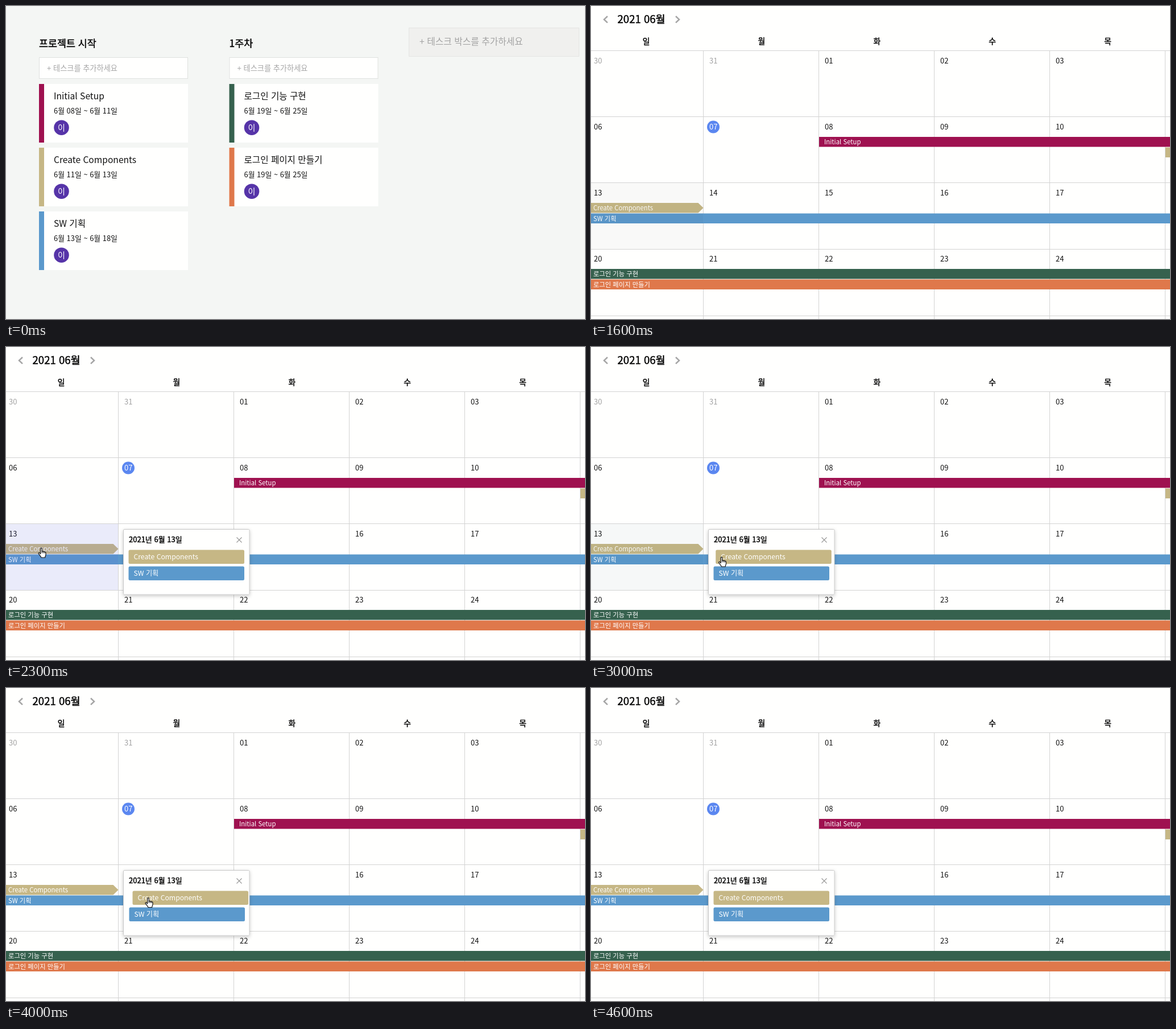
Animation, 1018 px wide and 550 px high, one loop 5400 ms. Source, as an HTML page:

```html
<!DOCTYPE html>
<html lang="ko">
<head>
<meta charset="utf-8">
<title>Task board and calendar</title>
<style>
  html, body { margin: 0; width: 100%; height: 100%; overflow: hidden; background: #fffffe; }
  svg { display: block; width: 100%; height: 100%; }
  text { font-family: "Noto Sans CJK KR", "Noto Sans CJK", "Noto Sans CJK JP", sans-serif; }
</style>
</head>
<body>
<svg id="stage" viewBox="0 0 1018 550"></svg>
<script>
const LOOP = 5400, STEP = 100;
const WINE = '#9f1150', TAN = '#c6b785', BLUE = '#5b99cc', GREEN = '#36614e', ORANGE = '#df784b';
const INK = '#111', LINE = '#d3d3d3';

const rect = (x, y, w, h, fill, more = '') =>
  `<rect x="${x}" y="${y}" width="${w}" height="${h}" fill="${fill}" ${more}/>`;
const text = (x, y, size, str, fill = INK, more = '') =>
  `<text x="${x}" y="${y}" font-size="${size}" fill="${fill}" ${more}>${str}</text>`;
const medium = (x, y, size, str, more = '') =>
  text(x, y, size, str, '#000', `stroke="#000" stroke-width=".4" ${more}`);
const path = (d, stroke, width, more = '') =>
  `<path d="${d}" fill="none" stroke="${stroke}" stroke-width="${width}" ${more}/>`;
const group = (id, body, more = '') => `<g id="${id}" ${more}>${body}</g>`;

// Board
function card(x, i, color, name, dates) {
  const y = 137 + i * 112;
  return rect(x, y, 262, 103, '#fffffe') + rect(x, y, 9, 103, color) +
    text(x + 26, y + 27, 15.6, name) +
    text(x + 26, y + 52, 12.9, dates) +
    `<circle cx="${x + 39.5}" cy="${y + 76.7}" r="13.3" fill="#5634a8"/>` +
    text(x + 39.5, y + 81.5, 14, '이', '#fff', 'text-anchor="middle"');
}

function column(x, name, cards) {
  return medium(x, 71.5, 17.4, name) +
    rect(x + .5, 90.5, 261, 37, '#fffffe', 'stroke="#dfe1df"') +
    text(x + 14, 114, 13.2, '+ 테스크를 추가하세요', '#a6a6a6') +
    cards.map((c, i) => card(x, i, ...c)).join('');
}

const board = rect(0, 0, 1018, 550, '#f4f6f4') +
  column(58, '프로젝트 시작', [
    [WINE, 'Initial Setup', '6월 08일 ~ 6월 11일'],
    [TAN, 'Create Components', '6월 11일 ~ 6월 13일'],
    [BLUE, 'SW 기획', '6월 13일 ~ 6월 18일']
  ]) +
  column(392.5, '1주차', [
    [GREEN, '로그인 기능 구현', '6월 19일 ~ 6월 25일'],
    [ORANGE, '로그인 페이지 만들기', '6월 19일 ~ 6월 25일']
  ]) +
  rect(708.5, 38.5, 299, 50, '#f0f0ee', 'stroke="#e4e5e3"') +
  text(727, 68, 15.8, '+ 테스크 박스를 추가하세요', '#a3a3a3');

// Calendar
const two = n => String(n).padStart(2, '0');

function dayCell(row, col) {
  const x = 5 + col * 203, y = 101 + row * 116;
  if (row === 0 && col < 2) return text(x, y, 13, 30 + col, '#a0a0a0');
  const n = row * 7 + col - 1, today = n === 7;
  return (today ? `<circle cx="${x + 7}" cy="${y - 4.5}" r="11" fill="#5b87f0"/>` : '') +
    text(x, y, 13, two(n), today ? '#fff' : INK);
}

const bar = (x, y, w, color, name = '', pad = 4) =>
  rect(x, y, w, 17.5, color) + text(x + pad, y + 13, 11.3, name, '#fff');

function calendarView() {
  let out = rect(0, 0, 1018, 550, '#fffffe') +
    path('M29 18l-6 5.7 6 5.7M149 18l6 5.7-6 5.7', '#a5a5a5', 2.5) +
    medium(46.5, 30, 18.6, '2021 06월');
  [...'일월화수목'].forEach((d, i) =>
    out += medium(97 + i * 202.9, 66.5, 13.8, d, 'text-anchor="middle"'));
  for (const y of [78.5, 194.5, 310.5, 427.5, 544.5]) out += path(`M0 ${y}H1018`, LINE, 1);
  for (let i = 0; i < 5; i++) out += path(`M${197.5 + i * 203} 78V550`, LINE, 1);
  for (let r = 0; r < 4; r++) for (let c = 0; c < 5; c++) out += dayCell(r, c);
  return out +
    bar(401, 230, 617, WINE, 'Initial Setup', 9) +
    bar(1010, 248.5, 8, TAN) +
    `<path d="M0 346H188.5L197.5 354.7 188.5 363.5H0z" fill="${TAN}"/>` +
    text(4, 359, 11.3, 'Create Components', '#fff') +
    bar(0, 364.5, 1018, BLUE, 'SW 기획') +
    bar(0, 462, 1018, GREEN, '로그인 기능 구현') +
    bar(0, 480.5, 1018, ORANGE, '로그인 페이지 만들기') +
    rect(0, 311, 197, 116, 'none', 'id="tint"');
}

const popupRow = (id, y, color, name) => group(id,
  `<rect x="215.5" y="${y}" width="203.5" height="24.5" rx="2.5" fill="${color}"/>` +
  text(224.5, y + 16.6, 12.2, name, '#fff'));

const popup = rect(206.5, 320.5, 221.5, 114.5, '#fffffe', 'rx="1.5" stroke="#c9c9c9" filter="url(#shadow)"') +
  medium(216, 343, 13, '2021년 6월 13일') +
  path('M405.5 334.5l9 9M414.5 334.5l-9 9', '#9a9a9a', 1.2) +
  popupRow('row1', 356.5, TAN, 'Create Components') +
  popupRow('row2', 385.5, BLUE, 'SW 기획');

const hand = '<path d="M5 1.5c0-1.8 2.6-1.8 2.6 0v5c.3-.9 2.2-.8 2.4.3c.5-.8 2.2-.5 2.3.6' +
  'c.6-.6 2-.2 2 1v3.3c0 2-1.3 2.6-1.3 5.3h-6.8c-.3-1.8-2.2-3.3-4.5-6.6c-1-1.6 .6-2.7 2-1.3l1.3 1.4z" ' +
  'fill="#fff" stroke="#111" stroke-width="1.2" stroke-linejoin="round"/>' +
  path('M7.6 6.5v2.8M10 6.8v2.6M12.3 7.4v2.2', INK, 1);

const stage = document.getElementById('stage');
stage.innerHTML =
  '<defs><filter id="shadow" x="-10%" y="-10%" width="120%" height="130%">' +
  '<feDropShadow dx="0" dy="2" stdDeviation="3" flood-opacity=".22"/></filter></defs>' +
  group('board', board) + group('calendar', calendarView()) +
  group('popup', popup) + group('cursor', hand);

const $ = id => document.getElementById(id);
const parts = Object.fromEntries(
  ['board', 'calendar', 'popup', 'cursor', 'tint', 'row1', 'row2'].map(id => [id, $(id)]));

// Pointer tip: [time, x, y], held until the next entry; no position hides it.
const POINTER = [
  [0], [1700, 46, 359.5], [2000, 62, 353], [2700, 112, 357], [2800, 179, 365],
  [3000, 229.5, 369], [3100, 256, 379], [3300, 257, 388], [3400, 258, 392],
  [3800, 256, 382], [3900, 253, 374], [4000, 250, 368.5], [4100, 236, 367],
  [4200, 150, 362], [4300, 64, 356], [4400]
];

// Hover colour of the 13th: [time, colour, opacity]
const HOVER = 'rgb(80,90,220)';
const TINT = [
  [0, HOVER, 0], [1600, '#000', .025], [1700, HOVER, .12], [3000, '#2a5a70', .04],
  [3100, HOVER, 0], [4200, HOVER, .06], [4300, HOVER, .12], [4400, HOVER, .008], [4600, HOVER, 0]
];

const at = (keys, t) => keys.filter(k => k[0] <= t).pop();
function ease(t, from, to) {
  const p = Math.min(1, Math.max(0, (t - from) / (to - from)));
  return p * p * (3 - 2 * p);
}
const show = (el, on) => el.setAttribute('visibility', on ? 'visible' : 'hidden');
const move = (el, x, y = 0) => el.setAttribute('transform', `translate(${x} ${y})`);

function render(time) {
  const t = Math.floor((time % LOOP) / STEP) * STEP;
  show(parts.board, t < 700);
  show(parts.calendar, t >= 700);
  show(parts.popup, t >= 2300);

  const [, color, alpha] = at(TINT, t);
  parts.tint.setAttribute('fill', color);
  parts.tint.setAttribute('fill-opacity', alpha);

  const down = ease(t, 3180, 3480), up = ease(t, 3766, 4066);
  move(parts.row1, 8 * (ease(t, 2880, 3130) - down + up - ease(t, 4110, 4300)));
  move(parts.row2, 8 * (down - up));

  const [, x, y] = at(POINTER, t);
  show(parts.cursor, x !== undefined);
  if (x !== undefined) move(parts.cursor, x - 6.3, y);
}

const start = performance.now();
function tick() {
  render(performance.now() - start);
  requestAnimationFrame(tick);
}
tick();
</script>
</body>
</html>
```
